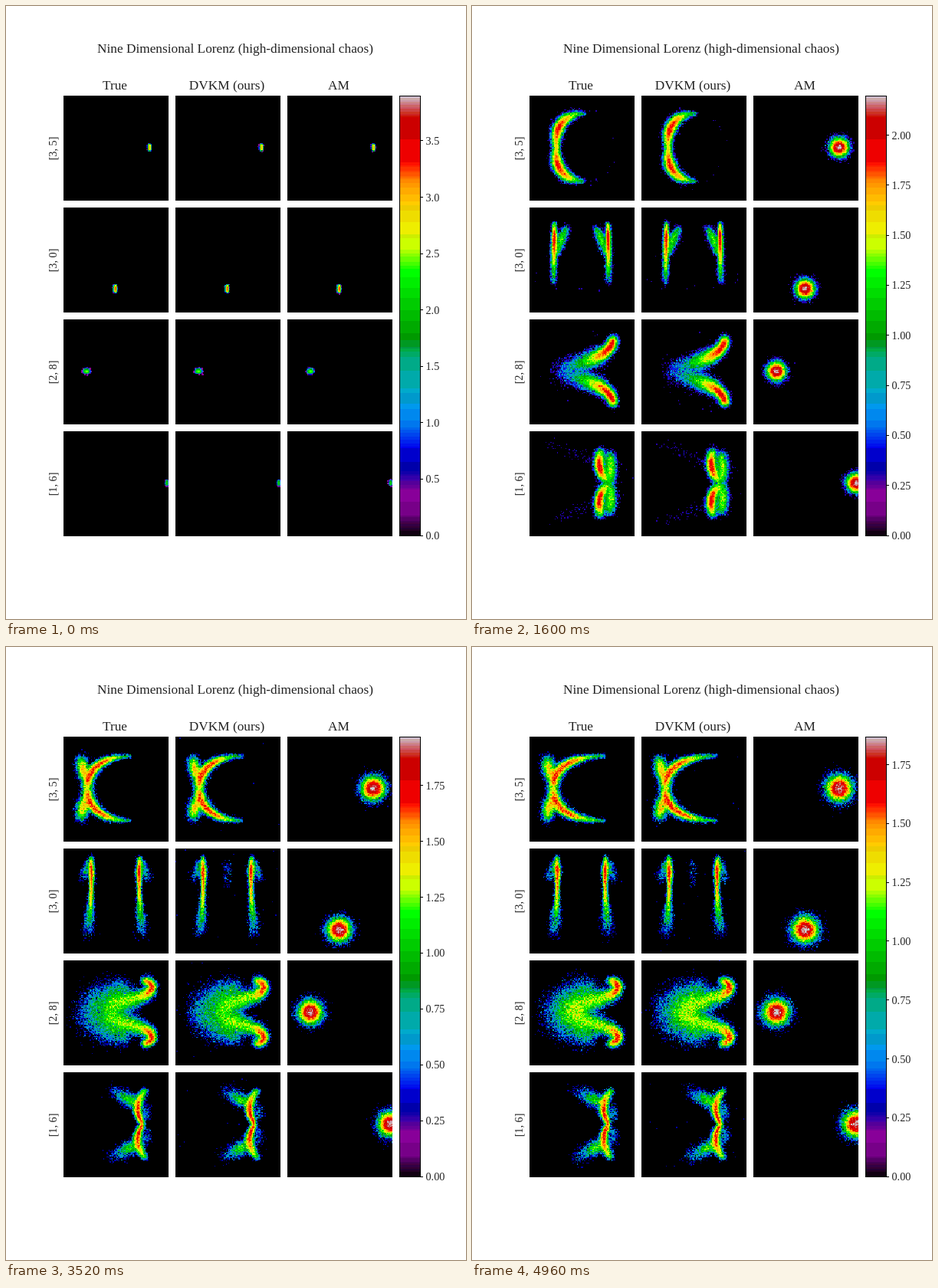
Write an HTML page with a canvas that moves like this. It is 600 px wide and 800 px high and loops after 5120 ms.

```html
<!DOCTYPE html>
<html lang="en">
<head>
<meta charset="utf-8">
<title>Density evolution</title>
<style>
html, body { margin: 0; width: 100%; height: 100%; overflow: hidden; background: #fff; }
canvas, svg { position: absolute; left: 0; top: 0; width: 600px; height: 800px; }
text { font: 17.3px "Liberation Serif", "Times New Roman", serif; fill: #222; }
.mid { text-anchor: middle; }
.small { font-size: 14.2px; }
</style>
</head>
<body>
<canvas id="stage" width="600" height="800"></canvas>
<svg viewBox="0 0 600 800">
  <text class="mid" x="299" y="61">Nine Dimensional Lorenz (high-dimensional chaos)</text>
  <text class="mid" x="142" y="109">True</text>
  <text class="mid" x="288" y="109">DVKM (ours)</text>
  <text class="mid" x="434" y="109">AM</text>
  <text class="mid small" transform="translate(66 186) rotate(-90)">[3, 5]</text>
  <text class="mid small" transform="translate(66 332) rotate(-90)">[3, 0]</text>
  <text class="mid small" transform="translate(66 478) rotate(-90)">[2, 8]</text>
  <text class="mid small" transform="translate(66 624) rotate(-90)">[1, 6]</text>
  <g id="ticks"></g>
</svg>
<script>
const FRAMES = 32, STEP = 160, BINS = 100, SIZE = 137, BIN = SIZE / BINS, AXIS = 67.5;
const ORBIT = 6, SPLIT = 10, SETTLED = 18;
const BAR = { x: 513, y: 117, w: 27, h: 574 };

const mix = (a, b, t) => a + (b - a) * t;
const clamp = t => Math.min(1, Math.max(0, t));

// Even steps through a short list of values.
function along(list, t) {
  if (list.length === 1) return list[0];
  const p = t * (list.length - 1), i = Math.min(list.length - 2, Math.floor(p));
  return mix(list[i], list[i + 1], p - i);
}

// Bezier curve of any order over u, v pairs.
function bezier(pts, t) {
  while (pts.length > 2) pts = pts.slice(2).map((p, i) => mix(pts[i], p, t));
  return pts;
}

// Each pen takes a path (along, away from the mirror axis), spreads and levels of the scale.
function rowA(orbit, split, settled, g) {
  orbit([114, 0, 108, 60, 17, 72, 33, 15], [2.6, 2.5, 2, 2, 2.5], [.5, .54, .59, .75, .9]);
  split([72, 44, 44, 44, 32, 26, 35, 0], [1.5, 3.2, 3.6, 2.5], [.4, .78, .9, .7]);
  settled([82 + 16 * g, 42, 46, 42, 30, 20, 31, 2], [1.2, 2.5, 3.5, 3.4], [.42, .83, .85, .8]);
  settled([23, 38, 27, 15], [3.6], [.62, .79, .7]);
}

function rowB(orbit, split, settled) {
  orbit([106, 0, 107, 118, 60, 26, 20, 18.5], [2.2, 1.7, 2.2, 2.3, 1.7], [.52, .55, .62, .68, .86, .6]);
  split([20, 35, 98, 36], [1.5, 1.8, 2], [.6, .92, .86, .74, .58, .35]);
  split([26, 18, 36, 26, 60, 31], [2, 3.2, 2.2], [.4, .62, .5]);
  settled([11, 32, 60, 29, 113, 36], [1.5, 2, 1.3, 1.8, 3, 4], [.6, .9, .83, .77, .62, .45, .15]);
  settled([18, 35, 40, 43], [2, 3], [.5, .26]);
}

function rowC(orbit, split, settled, g) {
  orbit([30, 0, 30, 30, 62, 62, 94, 45], [1.7, 2, 3.5], [.62, .66, .76], 0, .6);
  orbit([94, 45, 116, 34, 112, 18, 86, 5], [3.5, 4, 3], [.76, .87, .83, .25], .6, 1);
  split([109, 42, 108, 24, 84, 13, 38, 3], [3, 3.6, 5.5, 6], [.86, .9, .8, .52, .15]);
  settled([105, 41, 124, 38, 116, 24, 100, 20], [2.8, 2.8, 4.5], [.8, .86, .84, .7]);
  settled([98, 20, 60 - 10 * g, 6 - 3 * g], [5, 8], [.69, .57]);
  settled([80, 33, 32, 4], [5, 10, 9], [.45, .45, .38]);
}

function rowD(orbit, split, settled, g) {
  orbit([134, 0, 134, 12, 124, 22, 110, 28], [1.2], [.72, .68], 0, .4);
  orbit([108, 17, 23, 54], [4.3, 3.3, 2], [.86, .82, .66], .4, 1);
  split([93, 42, 86, 20, 100, 3], [3], [.6, .9, .88, .6]);
  split([104, 37, 108, 18, 104, 2], [3.7], [.58, .66, .55]);
  split([84, 27, 24, 52], [4], [.05, .012]);
  settled([107, 44, 88, 24, 103, 1], [2, 3, 2.5, 1.8], [.6, .8, .88, .85]);
  settled([90, 29, 62 - 3 * g, 45], [4, 4.6], [.72, .5, .28, .09]);
  settled([108, 24, 109, 8], [3], [.18 + .1 * g, .24 + .12 * g]);
}

const ROWS = [
  { paint: rowA, at: [112, 0], seed: [112, 0, 112, 3], spread: .8, level: .82 },
  { paint: rowB, at: [106, 0], seed: [102.5, 0, 109.5, 0], spread: .8, level: .76, flip: true },
  { paint: rowC, at: [30, 0], seed: [28, 0, 32, 0], spread: 1.4, level: .58 },
  { paint: rowD, at: [134, 0], seed: [134.5, 0, 134.5, 2.4], spread: .9, level: .55 }
];

// Largest value on the colour scale, in log10 of the bin count.
function scaleMax(f) {
  if (f === 0) return 3.9;
  const bump = .028 * Math.max(0, 1 - Math.abs(f - 26) / 4);
  return 2.864 - .667 * Math.log10(f) + bump;
}

// Spectral ramp, one hex digit per channel for each twentieth of the scale.
const RAMP = "000 708 809 00a 00d 07d 09d 0aa 0a8 090 0b0 0d0 0f0 bf0 ee0 fc0 f90 f00 d00 c00 ccc"
  .split(" ").map(s => [...s].map(c => parseInt(c, 16) * 17));
const lut = Array.from({ length: 256 }, (_, k) => {
  const p = k / 255 * 20, i = Math.min(19, Math.floor(p));
  return RAMP[i].map((c, j) => {
    const q = j === 1 || p < 3 ? 17 : 34;
    return Math.min(255, Math.round(mix(c, RAMP[i + 1][j], p - i) / q) * q);
  });
});
const colour = t => lut[Math.round(clamp(t) * 255)];

function seeded(s) {
  return () => {
    s = s + 0x6D2B79F5 | 0;
    let t = Math.imul(s ^ s >>> 15, 1 | s);
    t = t + Math.imul(t ^ t >>> 7, 61 | t) ^ t;
    return ((t ^ t >>> 14) >>> 0) / 4294967296;
  };
}

function makeField(flip, rnd) {
  const bins = new Uint16Array(BINS * BINS);
  const hit = (u, v) => {
    const x = Math.floor((flip ? v : u) / BIN), y = Math.floor((flip ? u : v) / BIN);
    if (x >= 0 && y >= 0 && x < BINS && y < BINS) bins[y * BINS + x]++;
  };
  const scatter = (u, v, s, n) => {
    for (n = Math.floor(n + rnd()); n > 0; n--) {
      const r = s * Math.sqrt(-2 * Math.log(1 - rnd())), a = rnd() * 2 * Math.PI;
      const w = v + r * Math.sin(a);
      hit(u + r * Math.cos(a), AXIS + (rnd() < .5 ? w : -w));
    }
  };
  // Spreads points along a path so that its core reaches the given levels.
  const stroke = (path, spread, level, top, weight, part = 1) => {
    const steps = 80;
    for (let k = 0; weight > 0 && k < part * steps; k++) {
      const t = (k + .5) / steps;
      const [x0, y0] = bezier(path, k / steps), [x1, y1] = bezier(path, (k + 1) / steps);
      const s = along(spread, t), count = 10 ** (along(level, t) * top) - 1;
      const area = s * Math.sqrt(2 * Math.PI) * Math.hypot(x1 - x0, y1 - y0) / BIN ** 2;
      scatter((x0 + x1) / 2, (y0 + y1) / 2, s, 2 * weight * count * area);
    }
  };
  return { bins, hit, scatter, stroke };
}

function density(row, r, col, f) {
  const rnd = seeded(f * 7919 + r * 131 + col * 37 + 5);
  const { bins, hit, scatter, stroke } = makeField(row.flip, rnd);
  const cloud = share => scatter(...row.at, BIN * Math.sqrt(3.28 * f ** .67), 15000 * share);

  if (f === 0) {
    stroke(row.seed, [row.spread], [row.level], scaleMax(0), 1);
    return bins;
  }
  if (col === 2) {
    cloud(1);
    return bins;
  }

  const reach = Math.min(1, (f / ORBIT) ** 1.3);
  const a = clamp((f - ORBIT) / (SPLIT - ORBIT)), b = clamp((f - SPLIT) / (SETTLED - SPLIT));
  const grow = clamp((f - SETTLED) / (FRAMES - 1 - SETTLED));
  const orbit = (path, spread, level, from = 0, to = 1) => {
    const part = clamp((reach - from) / (to - from));
    stroke(path, spread, level, scaleMax(ORBIT), 1 - a, part);
    // Stragglers on the first orbit.
    if (a > 0) stroke(path, spread, [.004], 2.2, 1 - b);
  };
  const split = (path, spread, level) => stroke(path, spread, level, scaleMax(SPLIT), a * (1 - b));
  const settled = (path, spread, level) =>
    stroke(path, spread.map(s => s * (1 + .1 * grow)), level, scaleMax(Math.max(f, SETTLED)), b);

  if (f < ORBIT) cloud(1 - f / ORBIT);
  row.paint(orbit, split, settled, grow);
  if (col === 1 && f > SPLIT) {
    for (let n = 8 + r % 2 * 8; n > 0; n--) hit(rnd() * SIZE, rnd() * SIZE);
    if (r === 1) stroke([18, 2, 50, 2], [1.8], [.14, .07], 1.9, 1);
  }
  return bins;
}

const ctx = document.getElementById("stage").getContext("2d");
const ticks = document.getElementById("ticks");
ctx.imageSmoothingEnabled = false;
const tile = document.createElement("canvas");
tile.width = tile.height = BINS;
const tctx = tile.getContext("2d");
const img = tctx.createImageData(BINS, BINS);

for (let y = 0; y < BAR.h; y++) {
  ctx.fillStyle = `rgb(${colour(1 - (y + .5) / BAR.h)})`;
  ctx.fillRect(BAR.x, BAR.y + y, BAR.w, 1);
}
ctx.strokeRect(BAR.x + .5, BAR.y + .5, BAR.w, BAR.h);

function drawTicks(top) {
  const step = top > 2.25 ? .5 : .25;
  let out = "";
  for (let v = 0; v <= top; v += step) {
    const y = BAR.y + BAR.h * (1 - v / top);
    out += `<path d="M541 ${Math.floor(y) + .5}h3" stroke="#000"/>` +
      `<text class="small" x="547.5" y="${(y + 5).toFixed(1)}">${v.toFixed(step === .5 ? 1 : 2)}</text>`;
  }
  ticks.innerHTML = out;
}

function draw(f) {
  const top = scaleMax(f);
  ROWS.forEach((row, r) => {
    for (let col = 0; col < 3; col++) {
      density(row, r, col, f).forEach((n, i) => {
        img.data.set(colour(Math.log10(1 + n) / top), i * 4);
        img.data[i * 4 + 3] = 255;
      });
      tctx.putImageData(img, 0, 0);
      ctx.drawImage(tile, 75 + col * 146, 117 + r * 146, SIZE, SIZE);
    }
  });
  drawTicks(top);
}

const begin = performance.now();
let shown = -1;
function tick() {
  const f = Math.floor((performance.now() - begin) / STEP) % FRAMES;
  if (f !== shown) draw(shown = f);
  requestAnimationFrame(tick);
}
tick();
</script>
</body>
</html>
```
